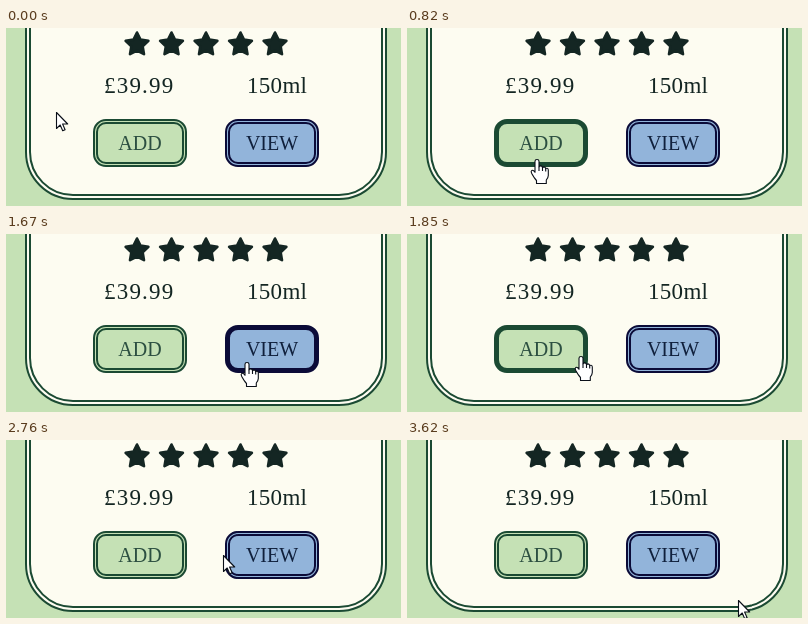
An HTML page that plays this animation: 395x178 px, repeating every 3700 ms.

```html
<!DOCTYPE html>
<html lang="en">
<head>
<meta charset="utf-8">
<title>Product card</title>
<style>
  :root { --leaf: #c5e1b5; --green: #1b4a33; --navy: #0b0b38; --ink: #142623; }
  html, body { margin: 0; width: 100%; height: 100%; overflow: hidden; background: var(--leaf); }
  body { position: relative; font-family: "Liberation Serif", "Times New Roman", serif; }
  body > * { position: absolute; box-sizing: border-box; }
  .card {
    left: 19px; top: -60px; width: 362px; height: 232px;
    border: 6px double var(--green); border-radius: 48px; background: #fdfcf1;
  }
  .label { top: 46px; font-size: 23px; line-height: 24px; color: var(--ink); white-space: nowrap; }
  .price { left: 98px; letter-spacing: 1.2px; }
  .size { left: 241px; letter-spacing: .3px; }
  .button {
    top: 91px; width: 94px; height: 48px; border: 5px double; border-radius: 13px;
    font-size: 20px; line-height: 38px; text-align: center;
  }
  .add { left: 87px; border-color: var(--green); background: var(--leaf); color: #2c4f41; }
  .view { left: 219px; border-color: var(--navy); background: #92b4da; color: #10203c; }
  .hover { border-style: solid; }
  svg { left: 0; top: 0; }
  .star { fill: var(--ink); stroke: var(--ink); stroke-width: 2.6; stroke-linejoin: round; }
  .pointer path { fill: #fff; stroke: #0a0f18; stroke-width: 1.1; stroke-linejoin: round; }
  .pointer .lines { fill: none; }
</style>
</head>
<body>
<div class="card"></div>
<div class="label price">£39.99</div>
<div class="label size">150ml</div>
<div class="button add">ADD</div>
<div class="button view">VIEW</div>
<svg width="395" height="178" viewBox="0 0 395 178">
  <defs>
    <path id="star" d="M0-12 3.5-4.9 11.4-3.7 5.7 1.9 7 9.7 0 6-7 9.7-5.7 1.9-11.4-3.7-3.5-4.9Z"/>
  </defs>
  <g class="star">
    <use href="#star" x="131" y="16.5"/>
    <use href="#star" x="165.5" y="16.5"/>
    <use href="#star" x="200" y="16.5"/>
    <use href="#star" x="234.5" y="16.5"/>
    <use href="#star" x="269" y="16.5"/>
  </g>
  <g class="pointer" id="pointer">
    <path id="arrow" d="M.5.5V16.5L4.2 13 6.7 18.7 9.1 17.7 6.6 12H11.7Z"/>
    <g id="hand">
      <path d="M-2 2.2Q-2 .5 0 .5T2 2.2V7.8Q2.4 6.9 3.7 6.9 5.4 6.9 5.5 8.6 6 7.9 7.1 7.9 8.6 8 8.7 9.7 9.2 9.2 10 9.3 11.3 9.5 11.3 11V16.5Q11.3 18.5 9.3 21V24.5H-.5V21.5Q-2.5 19.5-5.4 14.2-6.4 12.2-5.2 11.4-3.8 10.6-2 13.3Z"/>
      <path class="lines" d="M2 7.8V12M5.5 8.6V12M8.7 9.7V12.5"/>
    </g>
  </g>
</svg>
<script>
  const LOOP = 3700;
  // Pointer stops: time, x, y
  const stops = [
    [0, 50, 84],
    [80, 55, 87], [160, 72, 98], [250, 99, 115], [330, 119, 129], [410, 124, 131],
    [820, 130, 131], [910, 158, 131], [990, 208, 131], [1090, 248, 131], [1160, 250, 131], [1240, 250, 131],
    [1670, 241, 128], [1750, 212, 124], [1840, 174, 122], [1920, 145, 123], [2010, 126, 125], [2100, 121, 125],
    [2610, 128, 124], [2690, 164, 119], [2760, 217, 115], [2860, 246, 120], [2940, 252, 124], [3020, 253, 125],
    [3530, 286, 143], [3620, 331, 160]
  ];
  const find = q => document.querySelector(q);
  const pointer = find("#pointer"), arrow = find("#arrow"), hand = find("#hand");
  const buttons = [[find(".add"), 87], [find(".view"), 219]];

  function draw(now) {
    const t = now % LOOP;
    const [, x, y] = stops.findLast(s => s[0] <= t);
    let over = false;
    for (const [el, left] of buttons) {
      const hit = x >= left && x < left + 94 && y >= 91 && y < 139;
      el.classList.toggle("hover", hit);
      over = over || hit;
    }
    arrow.style.display = over ? "none" : "";
    hand.style.display = over ? "" : "none";
    pointer.setAttribute("transform", `translate(${x} ${y})`);
  }

  const start = performance.now();
  function tick() {
    draw(performance.now() - start);
    requestAnimationFrame(tick);
  }
  tick();
</script>
</body>
</html>
```
